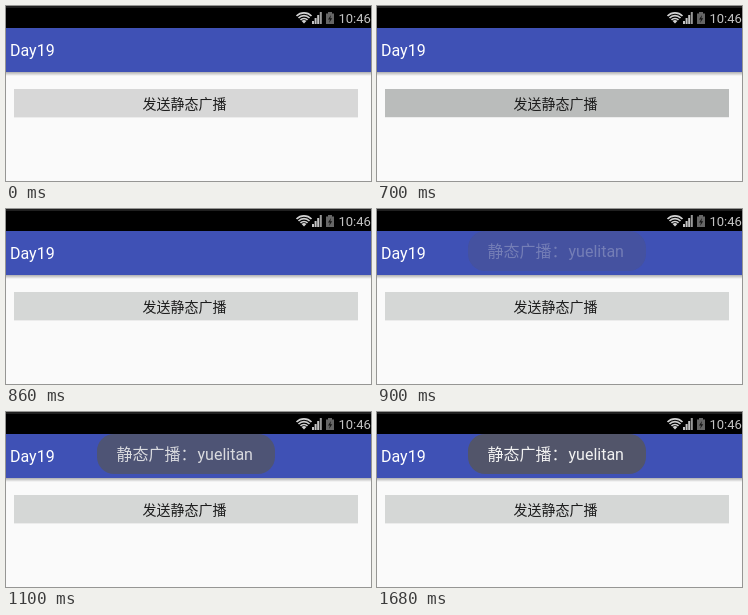
An HTML page with a canvas that plays this animation: 365 px wide and 175 px high, repeating every 2 s.

```html
<!DOCTYPE html>
<html lang="zh-CN">
<head>
<meta charset="utf-8">
<style>
  html, body { margin: 0; width: 100%; height: 100%; overflow: hidden; background: #fafafa; }
  canvas { display: block; }
</style>
</head>
<body>
<canvas id="stage" width="365" height="175"></canvas>
<script>
const ctx = document.getElementById('stage').getContext('2d');
const LOOP = 2000, STEP = 100, PRESS_AT = 700, TOAST_AT = 900;
const TOAST_ALPHA = [0.28, 0.6, 0.85, 1];
const LATIN = 'Roboto, "Noto Sans CJK SC", "Noto Sans CJK", sans-serif';
const CJK = '"Noto Sans CJK SC", "Noto Sans CJK", sans-serif';

function rect(x, y, w, h, color) {
  ctx.fillStyle = color;
  ctx.fillRect(x, y, w, h);
}

function text(str, x, y, size, color, family = LATIN, weight = 400) {
  ctx.font = `${weight} ${size}px ${family}`;
  ctx.fillStyle = color;
  ctx.fillText(str, x, y);
}

function polygon(points, color) {
  ctx.beginPath();
  points.forEach(([x, y]) => ctx.lineTo(x, y));
  ctx.closePath();
  ctx.fillStyle = color;
  ctx.fill();
}

function wifi(x, y) {
  ctx.fillStyle = ctx.strokeStyle = '#d2d2d2';
  ctx.lineWidth = 1.7;
  for (const r of [5, 7.8, 10.6]) {
    ctx.beginPath();
    ctx.arc(x, y, r, -Math.PI * 0.75, -Math.PI * 0.25);
    ctx.stroke();
  }
  ctx.beginPath();
  ctx.moveTo(x, y);
  ctx.arc(x, y, 3.4, -Math.PI * 0.75, -Math.PI * 0.25);
  ctx.fill();
}

function signal(x, y) {
  for (let i = 0; i < 4; i++) {
    const h = 3 + i * 3;
    rect(x + i * 2.6, y - h, 2, h, i < 3 ? '#c4c4c4' : '#999');
  }
}

function battery(x, y) {
  rect(x + 2, y, 4, 2, '#666');
  rect(x, y + 1.5, 8, 10.5, '#666');
  polygon([[x + 5, y + 3], [x + 2, y + 7.5], [x + 4, y + 7.5],
    [x + 3, y + 11], [x + 6.2, y + 6.3], [x + 4.3, y + 6.3]], '#161616');
}

function statusBar() {
  rect(0, 0, 365, 22, '#000');
  rect(0, 0, 365, 2, '#202020');
  wifi(298, 17.5);
  signal(306, 18);
  battery(320, 6);
  text('10:46', 332.5, 17, 13, '#c4c4c4');
}

function appBar() {
  rect(0, 22, 365, 44, '#3f51b5');
  const shade = ctx.createLinearGradient(0, 66, 0, 70);
  shade.addColorStop(0, 'rgba(0,0,0,.3)');
  shade.addColorStop(1, 'rgba(0,0,0,0)');
  rect(0, 66, 365, 4, shade);
  text('Day19', 4, 50, 16, '#fff');
}

function button(color) {
  rect(8, 111, 344, 1, '#ececec');
  rect(8, 83, 344, 28, color);
  text('发送静态广播', 136.5, 102.5, 14, '#1c1c1c', CJK);
}

function toast(alpha) {
  ctx.save();
  ctx.globalAlpha = alpha;
  ctx.beginPath();
  ctx.roundRect(91, 22, 178, 40, 17);
  ctx.fillStyle = '#52556a';
  ctx.fill();
  text('静态广播：', 110.5, 48, 16, '#f2f2f2', CJK);
  text('yuelitan', 191.5, 48, 16, '#f2f2f2');
  ctx.restore();
}

function buttonColor(t) {
  if (t < PRESS_AT) return '#d7d7d7';
  return t < PRESS_AT + STEP ? '#babcbb' : '#d5d7d6';
}

function draw(now) {
  const t = now % LOOP;
  rect(0, 0, 365, 175, '#fafafa');
  statusBar();
  appBar();
  button(buttonColor(t));
  if (t >= TOAST_AT) {
    const step = Math.floor((t - TOAST_AT) / STEP);
    toast(TOAST_ALPHA[Math.min(step, TOAST_ALPHA.length - 1)]);
  }
}

const start = performance.now();
function tick() {
  draw(performance.now() - start);
  requestAnimationFrame(tick);
}
tick();
</script>
</body>
</html>
```
